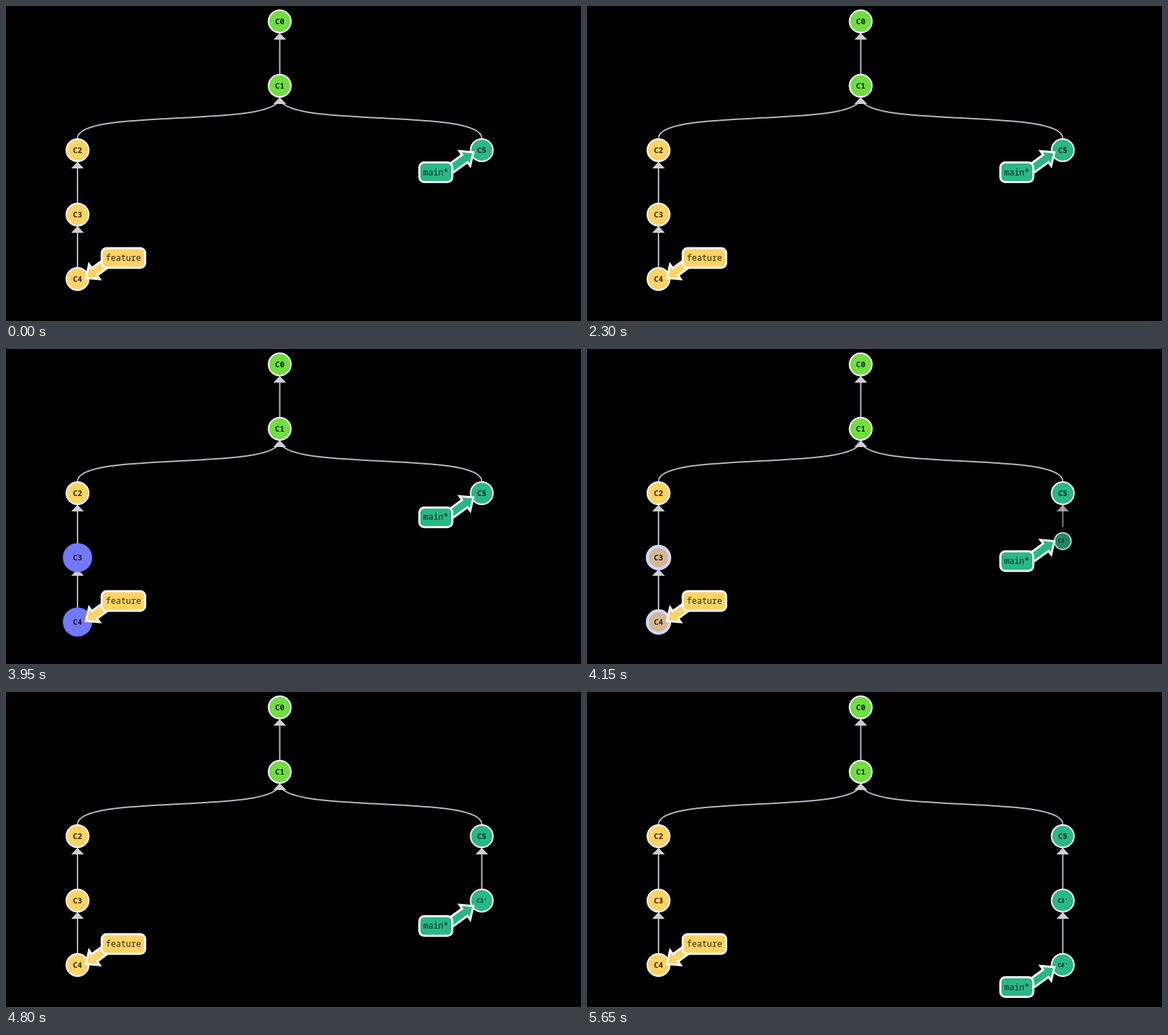
An HTML page with a canvas that plays this animation: 820 by 450 pixels, repeating every 7.3 s.

```html
<!DOCTYPE html>
<html lang="en">
<head>
<meta charset="utf-8">
<title>Commit tree</title>
<style>
  html, body { margin: 0; width: 100%; height: 100%; overflow: hidden; background: #000; }
  canvas { display: block; }
</style>
</head>
<body>
<canvas id="stage" width="820" height="450"></canvas>
<script>
const ctx = document.getElementById('stage').getContext('2d');
const LOOP = 7300, STEP = 92, REACH = 17, TIME = 400;
const LEFT = 102, MID = 390.4, RIGHT = 678.5;
const LIME = [112, 222, 64], YELLOW = [255, 211, 100], GREEN = [40, 184, 134];
const BLUE = [110, 117, 252], RIM = [252, 252, 255];
const EDGE = '#b9b8c4', HEAD = '#cfced2', INK = 'rgba(0, 0, 0, 0.82)';
const MONO = '"Noto Sans Mono", "DejaVu Sans Mono", monospace';

const rowY = row => 22 + row * STEP;
const clamp = v => Math.min(1, Math.max(0, v));
const rgb = c => `rgb(${c.map(Math.round)})`;
const mix = (a, b, k) => a.map((v, i) => v + (b[i] - v) * k);

// Cubic-bezier ease-in-out (.42, 0, .58, 1)
function ease(v) {
  const x = clamp(v);
  let lo = 0, hi = 1, s = 0.5;
  for (let i = 0; i < 20; i++) {
    s = (lo + hi) / 2;
    const at = 1.26 * s * (1 - s) ** 2 + 1.74 * s * s * (1 - s) + s ** 3;
    if (at < x) lo = s; else hi = s;
  }
  return s * s * (3 - 2 * s);
}

function bounce(v) {
  const n = clamp(v) * 2.75, arc = (center, base) => 7.5625 * ((n - center) / 2.75) ** 2 + base;
  if (n < 1) return arc(0, 0);
  if (n < 2) return arc(1.5, 0.75);
  if (n < 2.5) return arc(2.25, 0.9375);
  return arc(2.625, 0.984375);
}

function text(str, x, y, font) {
  ctx.font = `${font} ${MONO}`;
  ctx.textAlign = 'center';
  ctx.fillStyle = INK;
  ctx.fillText(str, x, y);
}

// Edge from a child up to its parent, with the arrowhead under the parent
function edge(x, y, px, py, alpha = 1) {
  const top = y - REACH, tip = py + REACH, bend = px === x ? 0 : 44;
  ctx.globalAlpha = alpha;
  ctx.strokeStyle = EDGE;
  ctx.lineWidth = 2;
  ctx.beginPath();
  ctx.moveTo(x, top);
  ctx.bezierCurveTo(x, top - bend, px, tip + bend, px, tip);
  ctx.stroke();
  ctx.fillStyle = HEAD;
  ctx.beginPath();
  ctx.moveTo(px, tip - 0.5);
  ctx.lineTo(px + 9, tip + 9);
  ctx.lineTo(px - 9, tip + 9);
  ctx.fill();
  ctx.globalAlpha = 1;
}

function node(id, x, y, color, { glow = 0, grow = 1 } = {}) {
  if (grow <= 0) return;
  ctx.globalAlpha = grow;
  ctx.beginPath();
  ctx.arc(x, y, 16 * grow, 0, 7);
  ctx.fillStyle = rgb(mix(color, BLUE, glow));
  ctx.fill();
  ctx.strokeStyle = rgb(mix(RIM, BLUE, glow));
  ctx.lineWidth = 2 + 8 * glow;
  ctx.stroke();
  const small = id.length > 2;
  text(id, x, y + (small ? 3 : 4), small ? 'bold 8px' : 'bold 11px');
  ctx.globalAlpha = 1;
}

// Branch label whose arrow points at (x, y); side is -1 for left, 1 for right
function branch(name, x, y, side, width, color) {
  ctx.fillStyle = rgb(color);
  ctx.strokeStyle = rgb(RIM);
  ctx.lineWidth = 3;

  ctx.save();
  ctx.translate(x + side * 12, y - side * 2.5);
  ctx.rotate(Math.atan2(-0.59, 0.81) + (side > 0 ? Math.PI : 0));
  ctx.beginPath();
  for (const [px, py] of [[0, 0], [-15, -13], [-15, -6.5], [-48, -6.5], [-48, 6.5], [-15, 6.5], [-15, 13]])
    ctx.lineTo(px, py);
  ctx.closePath();
  ctx.fill();
  ctx.stroke();
  ctx.restore();

  const cx = x + side * 65.5, cy = y - side * 31;
  ctx.beginPath();
  ctx.roundRect(cx - width / 2, cy - 14, width, 28, 7);
  ctx.fill();
  ctx.stroke();
  text(name, cx, cy + 4, '12px');
}

function draw(t) {
  const firstBirth = 3900, secondBirth = 4737;
  const move1 = ease((t - firstBirth) / TIME), move2 = ease((t - secondBirth) / TIME);
  const pop1 = bounce((t - firstBirth) / (2 * TIME)), pop2 = bounce((t - secondBirth) / (2 * TIME));
  const glow = start => ease((t - start) / 528) * (1 - move1);

  ctx.fillStyle = '#000';
  ctx.fillRect(0, 0, 820, 450);

  edge(MID, rowY(1), MID, rowY(0));
  edge(LEFT, rowY(2), MID, rowY(1));
  edge(RIGHT, rowY(2), MID, rowY(1));
  edge(LEFT, rowY(3), LEFT, rowY(2));
  edge(LEFT, rowY(4), LEFT, rowY(3));
  if (move1 > 0.001) edge(RIGHT, rowY(2 + move1), RIGHT, rowY(2), move1);
  if (move2 > 0.001) edge(RIGHT, rowY(3 + move2), RIGHT, rowY(3), move2);

  if (t > secondBirth) node("C4'", RIGHT, rowY(3 + pop2), GREEN, { grow: pop2 });
  if (t > firstBirth) node("C3'", RIGHT, rowY(2 + pop1), GREEN, { grow: pop1 });
  node('C0', MID, rowY(0), LIME);
  node('C1', MID, rowY(1), LIME);
  node('C2', LEFT, rowY(2), YELLOW);
  node('C3', LEFT, rowY(3), YELLOW, { glow: glow(2275) });
  node('C4', LEFT, rowY(4), YELLOW, { glow: glow(3080) });
  node('C5', RIGHT, rowY(2), GREEN);

  branch('feature', LEFT, rowY(4) + 1, 1, 62, YELLOW);
  branch('main*', RIGHT, rowY(2 + move1 + move2) + 0.5, -1, 47, GREEN);
}

const begin = performance.now();
function tick() {
  draw((performance.now() - begin) % LOOP);
  requestAnimationFrame(tick);
}
tick();
</script>
</body>
</html>
```
